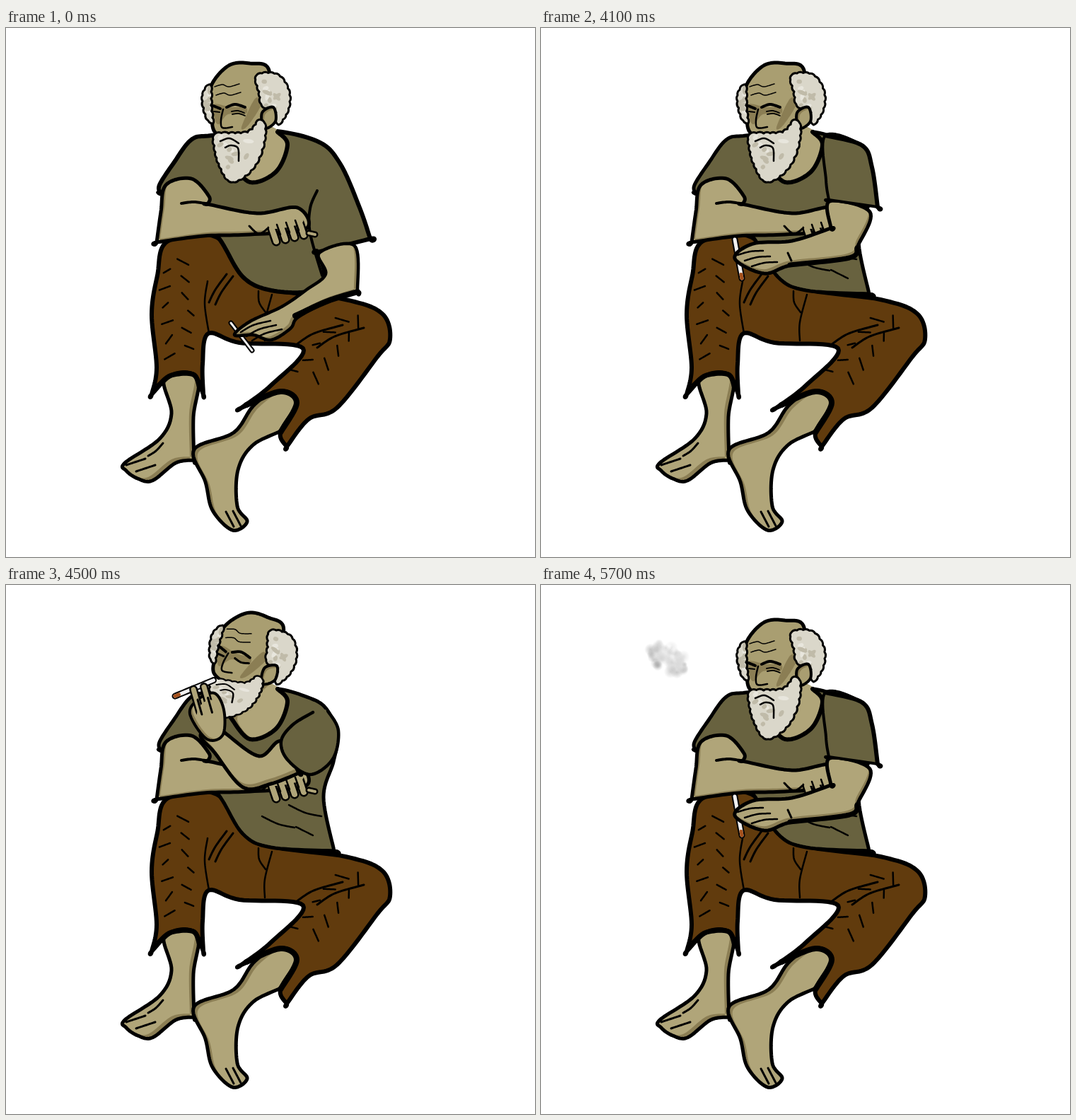
Write an HTML page with a canvas that moves like this. It is 748 px wide and 748 px high and loops after 5900 ms.

```html
<!DOCTYPE html>
<html lang="en">
<head>
<meta charset="utf-8">
<title>Smoke break</title>
<style>
html, body { margin: 0; width: 100%; height: 100%; overflow: hidden; background: #fff; }
canvas { display: block; width: 100vw; height: 100vh; }
</style>
</head>
<body>
<canvas id="stage" width="748" height="748"></canvas>
<script>
const ctx = document.getElementById('stage').getContext('2d');
const LOOP = 5900;
const INK = '#000', SKIN = '#b0a579', FACE = '#a99e71', SHADE = '#8b7e54';
const SHIRT = '#68623f', PANTS = '#613b0d', HAIR = '#dad7ca', GREY = '#c0bba9';

const parse = s => s.split(' ').map(p => p.split(',').map(Number));
const mix = (a, b, t) => a + (b - a) * t;
const spline = (a, b, c, d, t) =>
  b + t / 2 * (c - a + t * (2 * a - 5 * b + 4 * c - d + t * (3 * (b - c) + d - a)));

function random(seed) {
  return () => (seed = seed * 16807 % 2147483647) / 2147483647;
}

// Samples a smooth curve through key points; a repeated point makes a corner.
function smooth(key, closed) {
  const p = parse(key), n = p.length, out = [];
  const at = i => closed ? p[(i + n) % n] : p[Math.max(0, Math.min(n - 1, i))];
  for (let i = 0; i < (closed ? n : n - 1); i++) {
    for (let t = 0; t < 1; t += 1 / 12) {
      out.push([0, 1].map(k => spline(at(i - 1)[k], at(i)[k], at(i + 1)[k], at(i + 2)[k], t)));
    }
  }
  if (!closed) out.push(p[n - 1]);
  return out;
}

function pathOf(points, closed) {
  const path = new Path2D();
  points.forEach(p => path.lineTo(...p));
  if (closed) path.closePath();
  return path;
}

function ink(path, w, color = INK) {
  ctx.lineWidth = w;
  ctx.strokeStyle = color;
  ctx.stroke(path);
}

function fill(path, color) {
  ctx.fillStyle = color;
  ctx.fill(path);
}

function within(path, paint) {
  ctx.save();
  ctx.clip(path);
  paint();
  ctx.restore();
}

function about(x, y, turn, scaleY, paint) {
  ctx.save();
  ctx.translate(x, y);
  ctx.rotate(turn);
  ctx.scale(1, scaleY);
  ctx.translate(-x, -y);
  paint();
  ctx.restore();
}

// The base colour slides by (dx, dy) and leaves a shaded rim behind.
function shape(key, color, w = 5, dx = 0, dy = 0) {
  const path = pathOf(smooth(key, true), true);
  fill(path, dx || dy ? SHADE : color);
  if (dx || dy) within(path, () => {
    ctx.translate(dx, dy);
    fill(path, color);
  });
  if (w) ink(path, w);
}

const line = (key, w = 3, color = INK) => ink(pathOf(smooth(key)), w, color);

function finger(key, w = 8) {
  line(key, w + 5);
  line(key, w, SKIN);
}

// Repeats a stroke n times, each moved on by (dx, dy).
function fan(key, dx, dy, n, draw = line, w) {
  for (let i = 0; i < n; i++) {
    ctx.save();
    ctx.translate(i * dx, i * dy);
    draw(key, w);
    ctx.restore();
  }
}

// Curly mass: a clockwise outline of small bumps with mottled grey inside.
function tuft(key, seed) {
  const rnd = random(seed), path = new Path2D(), edge = smooth(key, true);
  let [x, y] = edge[0];
  path.moveTo(x, y);
  [...edge, edge[0]].forEach(([u, v], i) => {
    if (i < edge.length && Math.hypot(u - x, v - y) < 8) return;
    path.quadraticCurveTo((x + u) / 2 + (v - y) * 0.35, (y + v) / 2 - (u - x) * 0.35, u, v);
    [x, y] = [u, v];
  });
  fill(path, HAIR);
  const mid = [0, 1].map(k => edge.reduce((sum, p) => sum + p[k], 0) / edge.length);
  within(path, () => {
    for (let i = 0; i < 12; i++) {
      const p = edge[Math.floor(rnd() * edge.length)], far = 0.2 + rnd() * 0.6;
      const blob = new Path2D();
      blob.ellipse(mix(mid[0], p[0], far), mix(mid[1], p[1], far), 3, 3 + rnd() * 5, rnd() * 3, 0, 7);
      fill(blob, i % 3 ? GREY : '#e8e6dd');
    }
  });
  ink(path, 3);
}

// Short folds scattered on both sides of a limb's axis.
function creases(x, y, u, v, spread, n, seed) {
  const rnd = random(seed), axis = Math.atan2(v - y, u - x);
  for (let i = 0; i < n; i++) {
    const t = (i + 0.5) / n, off = (i % 2 ? 1 : -1) * spread * (0.5 + rnd() / 2);
    const cx = mix(x, u, t) - Math.sin(axis) * off, cy = mix(y, v, t) + Math.cos(axis) * off;
    const a = axis + (i % 2 ? 1 : -1) * (0.6 + rnd() * 0.7), r = 5 + rnd() * 5;
    const dx = Math.cos(a) * r, dy = Math.sin(a) * r;
    line(`${cx - dx},${cy - dy} ${cx + dx},${cy + dy}`, 2.5);
  }
}

function cigarette(x, y, u, v, w, lit) {
  const body = `${x},${y} ${u},${v}`;
  line(body, w + 4);
  line(body, w, '#f1f0f0');
  if (lit) line(`${mix(u, x, 0.1)},${mix(v, y, 0.1)} ${u},${v}`, w, '#a5511c');
}

function legs() {
  shape('224,495 234,545 217,581 168,615 170,626 186,637 207,640 240,615 266,611 266,611 265,550 271,492', SKIN, 5, -6, -5);
  fan('170,618 197,609', 14, 9, 2);
  line('201,605 212,598 222,587');
  shape('400,500 352,532 322,572 266,596 282,642 292,682 320,710 341,698 327,676 328,625 350,589 400,562 412,525', SKIN, 5, 6, 4);
  fan('311,684 322,705', 10, -1, 2);
}

function pants() {
  shape('298,296 228,302 214,350 206,405 213,480 206,518 206,518 234,491 265,490 279,518 279,518 278,475 286,432 330,445 420,453 375,505 333,537 333,537 388,514 411,530 388,572 397,592 397,592 428,553 468,537 525,465 543,440 532,404 480,384 350,362', PANTS, 6);
  line('216,505 234,491 265,490 274,510', 7);
  line('340,533 388,514 411,530 388,572', 8);
  creases(240, 325, 244, 470, 20, 12, 5);
  creases(495, 405, 415, 500, 18, 10, 9);
  fan('312,348 296,370 287,388', 9, 3, 2);
  line('285,358 281,390 287,432', 2.5);
  line('357,372 358,388 367,402', 2.5);
  line('376,377 366,416 366,442', 2.5);
  fan('506,424 465,436 440,452', -30, -4, 2);
}

const leftSide = '290,152 262,158 237,191 217,222 219,234 219,234 270,260 303,300 335,352 375,371 ';

function looseShirt() {
  shape(leftSide + '430,372 450,350 441,317 441,317 515,298 515,298 500,254 472,191 440,160 370,145', SHIRT, 6);
  line('440,230 430,255 430,290 447,350', 4);
}

function torso() {
  shape(leftSide + '464,376 464,376 449,300 463,250 468,215 455,178 430,160 370,145', SHIRT);
  fan('362,327 385,338 408,343', 38, -16, 2, line, 2.5);
  line('410,342 434,354', 2.5);
}

function neck() {
  shape('368,138 398,162 382,203 345,218 318,188 340,165', SKIN, 0, 9, 2);
  line('384,147 398,165 382,203 345,218 318,188', 6);
}

function foldedArm() {
  shape('226,222 262,213 287,238 285,249 285,249 355,262 412,254 424,284 345,292 280,294 213,303 213,303 219,260', SKIN, 5, 5, -5);
  line('248,248 266,246 286,249', 4);
  line('344,280 358,291 374,280');
  fan('376,284 382,302', 13, -3, 4, finger);
  shape('372,272 412,262 418,276 378,284', SKIN, 0);
  fan('383,278 388,292', 13, -3, 3, line, 2.5);
  finger('428,290 437,292', 4);
}

function restingArm() {
  cigarette(318, 417, 348, 456, 3);
  shape('443,318 452,348 425,370 390,394 345,415 323,434 350,434 375,441 402,425 413,409 455,387 497,373 497,373 493,308', SKIN, 4.5, -5, -4);
  line('409,407 455,386 497,373', 8);
  fan('332,430 350,420 374,414', 8, 6, 3, line, 2.5);
}

function reachArm() {
  cigarette(274, 299, 284, 354, 5, true);
  shape('408,245 465,260 449,306 436,325 355,335 315,347 274,326 300,305 355,301 410,283 410,283', SKIN, 5, -3, -6);
  line('352,335 436,325 447,311', 7);
  fan('278,321 296,316 314,315', 10, 8, 3, line, 2.5);
  line('349,318 354,329');
}

function openSleeve() {
  shape('402,152 454,166 468,197 476,253 476,253 407,243 407,243 403,215', SHIRT, 4);
  line('402,152 454,166 468,197 476,253', 6);
}

function bentSleeve() {
  const edge = '434,180 405,198 389,221 398,247 430,268 462,246 470,206 455,178';
  shape(edge, SHIRT, 0);
  line(edge, 4.5);
}

function raisedArm(turn) {
  shape('389,221 358,242 312,211 300,200 275,212 295,237 335,286 375,281 414,266 414,266', SKIN, 5, -2, -7);
  about(295, 215, turn, 1, () => {
    cigarette(269, 139, 224, 177, 5, true);
    shape('256,172 276,156 296,175 305,209 285,221 252,195', SKIN, 4, 3, -4);
    fan('264,187 246,160', 13, -8, 2, finger, 7);
    shape('266,172 286,168 301,208 286,216 262,194', SKIN, 0);
    fan('256,172 268,190', 13, -7, 2);
  });
}

function beard() {
  tuft('295,150 322,149 345,146 362,126 366,155 351,196 319,218 301,192 295,168', 7);
  line('303,160 316,156 329,163', 2.5);
  line('310,169 318,166 328,170 329,188', 2.5);
}

function head(eyesShut, tilted) {
  about(372, 130, tilted ? 0.3 : 0, 1, () => {
    shape('290,82 315,53 345,50 372,60 368,130 330,155 296,148 291,115', FACE, 5);
    shape('294,108 318,112 339,112 338,122 314,122 301,136 295,128', SHADE, 0);
    shape('352,100 361,108 342,138 333,140', SHADE, 0);
    tuft('354,67 384,66 400,90 398,118 382,139 381,116 363,112 358,90', 3);
    tuft('289,80 290,112 293,141 282,122 278,95', 4);
    shape('362,120 378,112 381,132 365,142', FACE, 4, 4, 3);
    about(345, 150, tilted ? -0.12 : 0, tilted ? 0.75 : 1, beard);
    fan('295,83 306,80 315,83 330,79', 2, 12, 2, line, 1.5);
    line('293,110 303,114', 4);
    line('312,112 324,108 338,112', 4);
    line('307,115 304,130 306,141 320,140', 2.5);
    if (eyesShut) {
      line('294,120 302,121');
      line('318,119 328,122 339,120');
    } else {
      line('294,118 302,119', 2);
      fan('319,118 328,117 337,120', 1, 4, 2, line, 1.8);
    }
  });
}

function smoke(x, y, size, turn) {
  const rnd = random(11);
  ctx.save();
  ctx.translate(x, y);
  ctx.rotate(turn);
  ctx.scale(size, size);
  for (let i = 0; i < 70; i++) {
    const a = rnd() * Math.PI * 2, d = Math.sqrt(rnd()), r = 4 + rnd() * 6;
    const px = Math.cos(a) * d * 30, py = Math.sin(a) * d * 18;
    const tone = Math.min(255, 212 - py * 1.6 + (rnd() - 0.5) * 50);
    const puff = ctx.createRadialGradient(px, py, 0, px, py, r);
    puff.addColorStop(0, `rgba(${tone},${tone},${tone},.8)`);
    puff.addColorStop(1, `rgba(${tone},${tone},${tone},0)`);
    ctx.fillStyle = puff;
    ctx.fillRect(px - r, py - r, r * 2, r * 2);
  }
  ctx.restore();
}

function restPose(blink) {
  looseShirt();
  neck();
  head(blink);
  restingArm();
  foldedArm();
}

function reachPose(lift) {
  torso();
  neck();
  head(false);
  foldedArm();
  about(450, 300, lift, 1, reachArm);
  openSleeve();
}

function raisedPose(inhale, eyesShut) {
  torso();
  neck();
  head(eyesShut, inhale);
  foldedArm();
  raisedArm(inhale ? 0.31 : 0);
  bentSleeve();
}

function draw(t) {
  ctx.fillStyle = '#fff';
  ctx.fillRect(0, 0, 748, 748);
  ctx.lineCap = ctx.lineJoin = 'round';
  legs();
  pants();
  if (t < 4100) restPose(t >= 2000 && t < 2100);
  else if (t < 4200 || t >= 5700) reachPose(0);
  else if (t < 4300) reachPose(0.36);
  else raisedPose(t >= 4500, t >= 4500 && t < 5200);

  if (t >= 5700) smoke(180, 104, 0.97, 0.6);
  else if (t >= 5200) smoke(212, 104, 1, 0);
  else if (t >= 5000) smoke(260, 133, 0.7, 0.2);
}

const start = performance.now();
function tick() {
  draw((performance.now() - start) % LOOP);
  requestAnimationFrame(tick);
}
tick();
</script>
</body>
</html>
```
